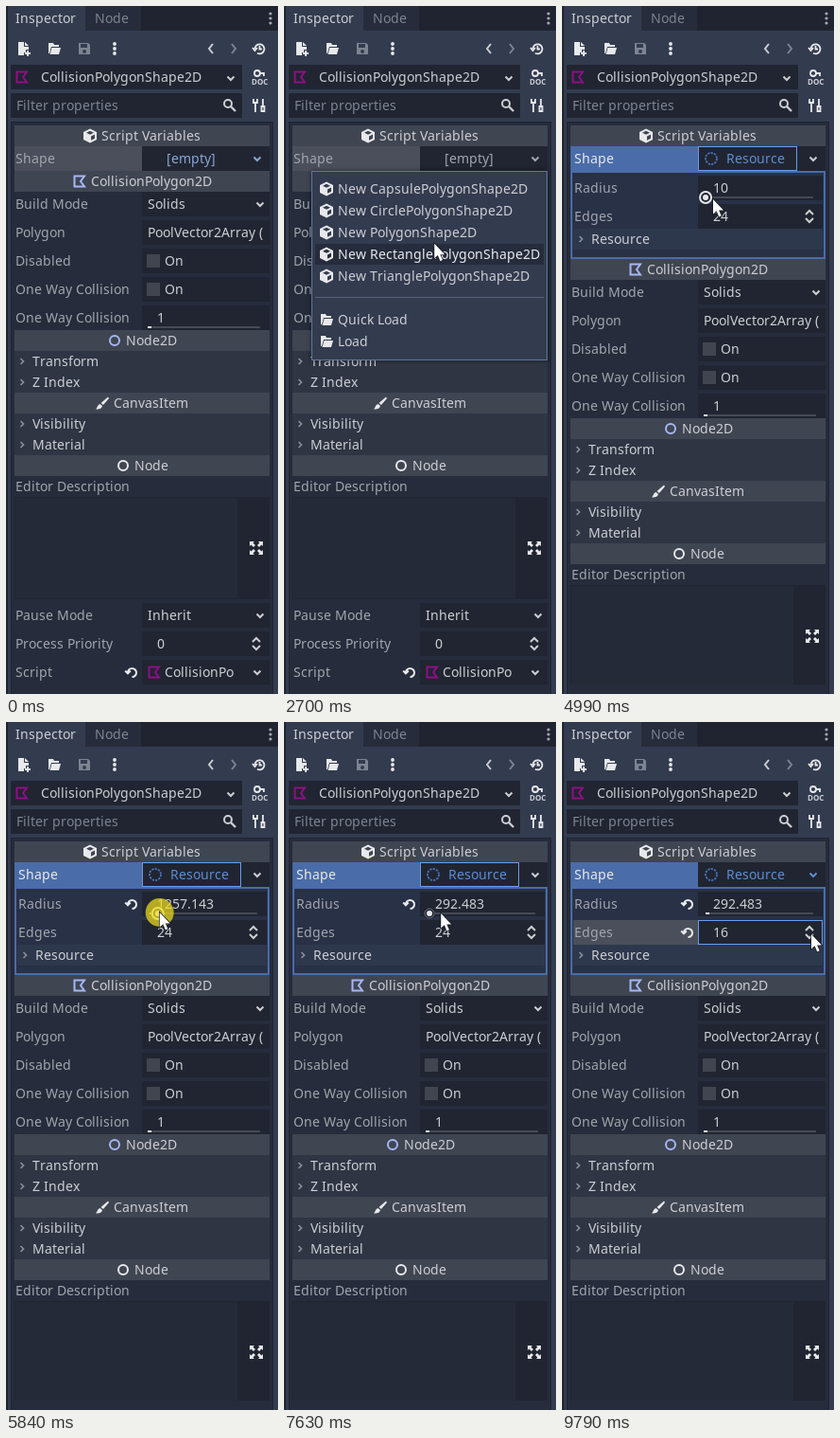
An HTML page with a canvas for the animation above (9.92 s loop, 288 px wide and 726 px high).

```html
<!DOCTYPE html>
<html lang="en">
<head>
<meta charset="utf-8">
<title>Inspector</title>
<style>
  html, body { margin: 0; width: 100%; height: 100%; overflow: hidden; background: #333b4f; }
  canvas { display: block; }
</style>
</head>
<body>
<canvas id="stage" width="288" height="726"></canvas>
<script>
const g = document.getElementById('stage').getContext('2d');
const LOOP = 9920;
const C = {
  base: '#333b4f', panel: '#262c3b', field: '#202531', bar: '#1f2430',
  category: '#404552', section: '#2f3543', selected: '#4a4f5b',
  text: '#ccced3', label: '#a1a5ad', dim: '#7d8491', white: '#e8e9ec',
  accent: '#699ce8', blue: '#4a6ca8', tint: '#283146', tintSection: '#2e384d',
  node2d: '#a5b7f3', magenta: '#8f0f86', track: '#454a55'
};

// ---- timing ----
// each move: start, end, steps, then keys [progress, ...values]
const CURSOR = [
  [690, 1420, 12, [.083, 8, 238], [1, 180, 158]],
  [2170, 2960, 13, [0, 180, 158], [1, 150, 292]],
  [3340, 3780, 8, [0, 150, 292], [.625, 160, 247], [1, 173, 221]],
  [4540, 5180, 11, [0, 173, 221], [.727, 160, 204], [1, 154, 201]],
  [7560, 8225, 11, [0, 156, 201], [.18, 166, 202], [1, 264, 224]]
];
const RADIUS = [
  [5450, 6430, 15, [0, 10], [.3, 700], [1, 4600]],
  [6500, 7424, 15, [0, 4600], [4 / 15, 3964.759], [1, 292.483]]
];
const CLICKS = [8290, 8560, 8732, 8904, 9076, 9248, 9420, 9670];
const PRESSES = [[1670, 1720], [4160, 4230], [5250, 7490], ...CLICKS.map(c => [c, c + 120])];
const MENU_OPEN = 1720, MENU_PICK = 4230;

function track(t, moves) {
  let now = moves[0][3].slice(1);
  for (const [start, end, steps, ...keys] of moves) {
    if (t < start) break;
    const gap = (end - start) / (steps - 1);
    const u = Math.min(1, (Math.floor((t - start + 10) / gap) + 1) / steps);
    let i = 1;
    while (i < keys.length - 1 && u > keys[i][0]) i++;
    const a = keys[i - 1], b = keys[i];
    const f = Math.max(0, (u - a[0]) / (b[0] - a[0]));
    now = a.slice(1).map((v, k) => v + (b[k + 1] - v) * f);
  }
  return now;
}

// ---- drawing helpers; y is the middle of a row ----
function box(x, y, w, h, color) { g.fillStyle = color; g.fillRect(x, y, w, h); }
function frame(x, y, w, h, color, lw = 1) {
  g.strokeStyle = color; g.lineWidth = lw;
  g.strokeRect(x + lw / 2, y + lw / 2, w - lw, h - lw);
}
// glyph advances snap to whole pixels
function text(s, x, y, color = C.text) {
  g.font = '14px "Noto Sans", sans-serif';
  g.fillStyle = color;
  for (const ch of s) {
    g.fillText(ch, x, y + 5);
    x += Math.round(g.measureText(ch).width);
  }
}
// icons live in a 16 by 16 box centred on x, y
function icon(d, x, y, color, lw = 0) {
  g.save();
  g.translate(x - 8, y - 8);
  const p = new Path2D(d);
  if (lw) { g.strokeStyle = color; g.lineWidth = lw; g.stroke(p); }
  else { g.fillStyle = color; g.fill(p, 'evenodd'); }
  g.restore();
}
function disc(x, y, r, color, lw = 0) {
  g.beginPath(); g.arc(x, y, r, 0, 7);
  if (lw) { g.strokeStyle = color; g.lineWidth = lw; g.stroke(); }
  else { g.fillStyle = color; g.fill(); }
}
const down = (x, y, c = C.text) => icon('M4.5 6.5L8 10L11.5 6.5', x, y, c, 2);
const right = (x, y) => icon('M6.5 5L9.5 8L6.5 11', x, y, '#8a909c', 1.6);
const spin = (x, y) => icon('M4 6L8 2L12 6M4 10L8 14L12 10', x, y, C.text, 2);
const flag = (x, y, c) => icon('M2.5 2.5H13L9 8L13 13.5H2.5Z', x, y, c, 2);
const ring = (x, y, c) => disc(x, y, 5, c, 2);
const folder = (x, y) => icon('M2 2H7L8 4H13V6H5L3 13H2ZM5.5 7H15L13 14H3.5Z', x, y, C.white);
const reset = (x, y) => icon('M4 8.5A4.5 4.5 0 1 1 8.5 13M1.2 6.5L4 9.3L6.8 6.5', x, y, C.white, 2);
const cube = (x, y) => icon('M8 .6L1 4V12L8 15.4L15 12V4ZM8 2.8L12 4.8L8 6.8L4 4.8Z' +
  'M13 6.6V10.8L9 12.8V8.6Z', x, y, C.white);
const brush = (x, y) =>
  icon('M14 1.5L15 3L9 10L6.5 8ZM5.5 9L8 11C7 14.5 4 14.5 1 14.5C3 13 2.5 10 5.5 9Z', x, y, C.white);

function category(name, x, y, draw, color) {
  box(9, y - 11, 270, 22, C.category);
  draw(x - 12, y, color);
  text(name, x, y);
}
function section(name, y) {
  box(9, y - 11, 270, 22, C.section);
  right(17, y);
  text(name, 28, y);
}
function field(name, y, w = 135) {
  text(name, 10, y, C.label);
  box(144, y - 13, w, 26, C.field);
}
function check(name, y) {
  field(name, y);
  box(149, y - 7, 14, 14, '#41454f');
  text('On', 168, y);
}

// ---- parts ----
function header() {
  box(0, 0, 288, 726, C.base);
  box(0, 0, 288, 26, C.bar);
  box(2, 0, 82, 26, C.base);
  box(84, 0, 59, 26, C.panel);
  box(0, 0, 2, 726, C.bar);
  text('Inspector', 10, 13);
  text('Node', 94, 13, C.dim);
  for (const d of [-5, 0, 5]) {
    disc(280, 13 + d, 1.6, '#a5a9b2');
    disc(115, 45 + d, 1.9, C.white);
  }

  icon('M2 1H8V6H13V9H10V12H8V15H2ZM9 1L13 5H9ZM11 10H13V12H15V14H13V16H11V14H9V12H11Z', 19, 45, C.white);
  folder(51, 45);
  icon('M2 2H12L14 4V14H2ZM4 3V7H11V3ZM8 9A2 2 0 1 0 8 13A2 2 0 1 0 8 9Z', 83, 45, C.dim);
  icon('M10 3L6 8L10 13', 217, 45, C.text, 2);
  icon('M6 3L10 8L6 13', 241, 45, C.dim, 2);
  icon('M3.5 8A5 5 0 1 1 6 12.7M1 7L3.5 10L6 7M8.5 5V8.5H11', 268, 45, C.white, 1.8);

  box(5, 62, 245, 26, C.field);
  flag(17, 75, C.magenta);
  text('CollisionPolygonShape2D', 37, 75);
  down(238, 76);
  disc(266, 71, 3, C.white, 1.8);
  icon('M9 4H13V7', 268, 75, C.white, 1.8);
  g.font = 'bold 8px "Noto Sans", sans-serif';
  g.fillText('DOC', 260, 83);

  box(5, 92, 245, 26, C.field);
  text('Filter properties', 11, 105, C.dim);
  disc(235, 103, 4, C.text, 2);
  icon('M9 9L14 14', 237, 105, C.text, 2.4);
  icon('M2 1V5H6V1M4 5V15M12 1V8M10.5 9H13.5V14H10.5Z', 268, 105, C.white, 1.8);

  box(5, 122, 278, 604, C.bar);
  box(6, 123, 276, 603, C.panel);
}

function properties() {
  category('CollisionPolygon2D', 90, 185, flag, C.node2d);
  field('Build Mode', 209);
  text('Solids', 150, 209);
  down(269, 209);
  field('Polygon', 239);
  text('PoolVector2Array (', 150, 239);
  check('Disabled', 269);
  check('One Way Collision', 299);
  field('One Way Collision', 329);
  text('1', 160, 329);
  box(150, 338, 119, 2, C.track);
  box(150, 338, 4, 2, C.white);

  category('Node2D', 127, 353, ring, C.node2d);
  section('Transform', 375);
  section('Z Index', 397);
  category('CanvasItem', 114, 419, brush);
  section('Visibility', 441);
  section('Material', 463);
  category('Node', 136, 485, ring, C.white);

  text('Editor Description', 10, 507, C.label);
  box(9, 518, 237, 108, '#252a38');
  frame(9, 518, 237, 108, C.field);
  box(246, 518, 33, 108, C.field);
  icon('M1 1H6L4.5 2.5L7 5L5 7L2.5 4.5L1 6ZM15 1V6L13.5 4.5L11 7L9 5L11.5 2.5L10 1Z' +
    'M1 15V10L2.5 11.5L5 9L7 11L4.5 13.5L6 15ZM15 15H10L11.5 13.5L9 11L11 9L13.5 11.5L15 10Z', 265, 572, C.white);

  field('Pause Mode', 643);
  text('Inherit', 150, 643);
  down(269, 643);
  field('Process Priority', 673);
  text('0', 160, 673);
  spin(265, 673);
  field('Script', 703);
  reset(133, 703);
  flag(157, 703, C.magenta);
  text('CollisionPo', 168, 703);
  down(266, 703);
}

function emptyShape(t) {
  box(9, 148, 135, 26, C.selected);
  text('Shape', 10, 161, C.label);
  box(144, 148, 135, 26, C.field);
  const color = t < 1670 ? '#8ba6d4' : C.label;
  text('[empty]', 170, 161, color);
  down(266, 161, color);
}

function resource(t, x, y, radius) {
  const edited = t >= CLICKS[0];
  box(9, 148, 135, 26, C.blue);
  text('Shape', 13, 161, C.white);
  box(144, 148, 135, 26, C.field);
  g.setLineDash([2.2, 1.2]);
  disc(158, 161, 6, '#4b72bd', 1.8);
  g.setLineDash([]);
  text('Resource', 174, 161, '#5f8cd4');
  down(266, 161, edited ? '#5f8cd4' : C.text);
  if (!edited) frame(144, 148, 105, 26, C.accent);

  box(9, 174, 270, 93, C.tint);
  frame(9, 174, 270, 93, C.blue, 2);
  text('Radius', 13, 192, C.label);
  box(144, 179, 132, 26, C.field);
  text(radius === 10 ? '10' : radius.toFixed(3), 160, 192);
  if (radius !== 10) reset(133, 192);
  box(152, 201, 114, 2, C.track);
  const knob = 152 + radius / 16384 * 114;
  box(152, 201, Math.max(2, knob - 150), 2, C.white);

  if (edited) box(12, 209, 132, 26, C.selected);
  text('Edges', 13, 222, C.label);
  box(144, 209, 132, 26, C.field);
  const clicks = CLICKS.filter(c => t >= c + 50).length;
  text(String(24 - clicks), 160, 222);
  spin(262, 222);
  if (clicks) reset(133, 222);
  if (edited) frame(144, 209, 132, 26, C.accent);

  const dragging = t >= 5250 && t < 7490;
  const over = x >= 144 && x < 276 && y >= 179 && y < 206;
  if (dragging || over) {
    const hot = t < 7490;
    disc(knob, 202, hot ? 7.5 : 6, C.field);
    if (hot) disc(knob, 202, 6, C.white, 2);
    else disc(knob, 202, 5, '#6a707d', 1);
    disc(knob, 202, 3, C.white);
  }

  box(12, 235, 264, 22, C.tintSection);
  right(20, 246);
  text('Resource', 31, 246);
}

function menu(y) {
  g.save();
  g.shadowColor = 'rgba(0, 0, 0, .5)';
  g.shadowBlur = 5;
  box(29, 174, 250, 200, C.base);
  g.restore();
  frame(29, 174, 250, 200, '#62769b');
  const hover = y > 181 ? Math.floor((y - 181.5) / 23) : -1;
  ['Capsule', 'Circle', '', 'Rectangle', 'Triangle'].forEach((kind, i) => {
    const row = 193 + 23 * i;
    if (i === hover) box(33, row - 11, 242, 22, C.panel);
    cube(45, row);
    text(`New ${kind}PolygonShape2D`, 57, row, i === hover ? C.white : C.text);
  });
  box(33, 307, 242, 1, '#59657d');
  ['Quick Load', 'Load'].forEach((name, i) => {
    folder(45, 331 + 23 * i);
    text(name, 57, 331 + 23 * i);
  });
}

function pointer(x, y) {
  const p = new Path2D('M0 0V15.5L3.6 12.3L6.2 18.4L8.7 17.3L6.1 11.4H11Z');
  g.save();
  g.translate(x, y);
  g.strokeStyle = '#15181f';
  g.lineWidth = 1.4;
  g.stroke(p);
  g.fillStyle = '#fff';
  g.fill(p);
  g.restore();
}

function draw(t) {
  const [radius] = track(t, RADIUS);
  let [x, y] = track(t, CURSOR);
  if (t >= 5250 && t < 7560) x = 154 + (radius - 10) / 16384 * 114;
  const picked = t >= MENU_PICK;

  header();
  category('Script Variables', 101, 137, cube);
  g.save();
  g.beginPath();
  g.rect(6, 123, 276, 593);
  g.clip();
  if (picked) g.translate(0, 93);
  properties();
  g.restore();

  if (picked) resource(t, x, y, radius);
  else emptyShape(t);
  if (t >= MENU_OPEN && !picked) menu(y);
  if (PRESSES.some(([a, b]) => t >= a && t < b)) disc(x, y, 15, 'rgba(240, 222, 30, .72)');
  if (t >= 690) pointer(x, y);
}

const begin = performance.now();
function tick() {
  draw((performance.now() - begin) % LOOP);
  requestAnimationFrame(tick);
}
tick();
</script>
</body>
</html>
```
